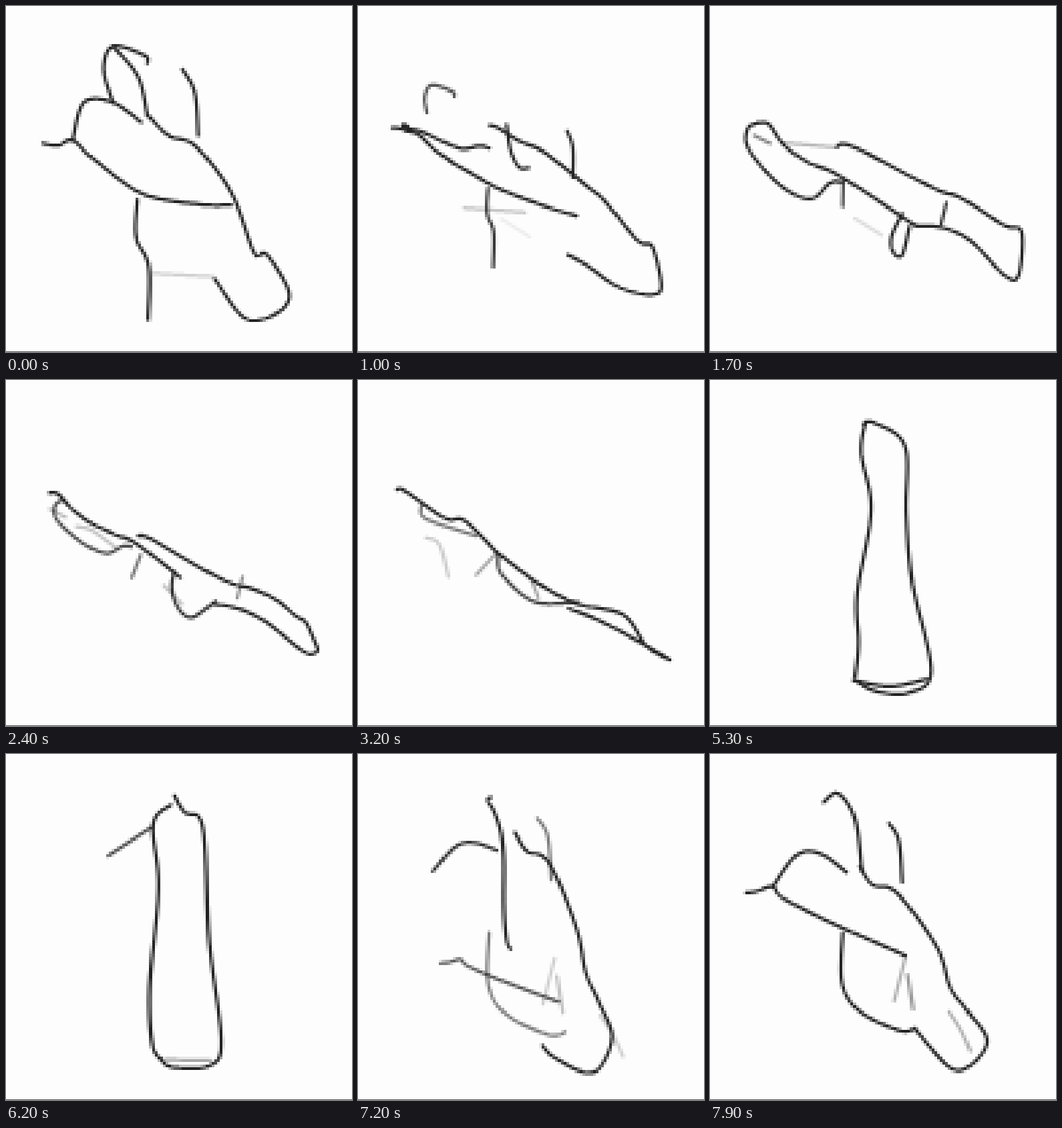
Animation, 518 px wide and 518 px high, one loop 8 s. Source, as an HTML page with a canvas:

```html
<!DOCTYPE html>
<html lang="en">
<head>
<meta charset="utf-8">
<title>Morphing sketch</title>
<style>
  html, body { margin: 0; width: 100%; height: 100%; overflow: hidden; background: #fdfdfd; }
  canvas { display: block; width: 100vw; height: 100vh; image-rendering: pixelated; }
  .rule { position: absolute; left: 0; right: 0; bottom: 0; height: 1px; background: #555; }
</style>
</head>
<body>
<canvas id="sketch" width="128" height="128"></canvas>
<div class="rule"></div>
<script>
const STAGE = 518, GRID = 128, LOOP = 8000, STEP = 100, SAMPLES = 90;
const HOLDS = [2500, 2900, 3300, 3800, 4300, 4700, 6100, 7100];
const MAIN = ['back', 'belly', 'neck'];

// A few key points per stroke, joined by a spline; "@" gives the opacity.
const POSES = [
  { t: 300, strokes: {
    back: '212,163 243,194 284,210 338,281 372,370 390,372 424,430 404,461 358,468 312,408',
    belly: '55,206 78,209 100,201 130,228 204,281 290,297 337,298',
    neck: '160,60 198,106 212,163',
    head: '100,201 117,144 160,144 203,174',
    crest: '160,144 146,95 160,60 208,74 212,86',
    leg: '197,290 195,346 214,390 213,470',
    tail: '264,95 283,130 288,194',
    wisp: '220,400 310,405 @.2'
  } },
  { t: 1700, strokes: {
    back: '190,211 215,211 335,273 375,287 440,328 467,338 462,404 440,402 388,350 345,331 308,329',
    belly: '72,175 88,177 110,207 145,233 195,255 308,329',
    neck: '288,311 272,345 274,368 288,373 299,330',
    head: '72,175 56,184 58,215 105,268 150,289 180,265 198,264',
    crest: '66,194 90,206 @.55',
    leg: '200,262 199,300 @.8',
    tail: '354,295 346,326 @.9',
    wisp: '110,205 190,212 @.3',
    flick: '217,318 257,343 @.15'
  } },
  { t: 3200, strokes: {
    back: '208,258 262,299 325,334 396,351 432,398 470,420 432,398 365,362 315,342',
    belly: '58,164 70,166 130,207 160,211 208,258',
    neck: '210,262 216,292 265,332 330,332 @.85',
    head: '95,188 102,208 177,233 @.6',
    leg: '205,262 177,292 @.4',
    wisp: '102,236 122,246 135,295 @.22',
    flick: '258,295 270,325 @.4'
  } },
  { t: 4100, strokes: {
    back: '250,210 266,289 340,360 392,395 436,412 470,435 408,417',
    belly: '54,440 425,439 @.85',
    neck: '192,51 220,54 232,100 240,145 236,280 232,304 @.9',
    head: '103,98 101,145 @.9',
    crest: '103,98 140,86 @.2',
    leg: '218,60 218,90 @.8',
    wisp: '101,145 126,180 182,203 @.2',
    flick: '260,434 320,434 @.3'
  } },
  { t: 5300, strokes: {
    back: '230,66 243,63 292,98 294,200 303,305 331,435 300,468 250,467 217,450',
    belly: '215,450 270,459 325,448',
    neck: '232,65 226,110 241,195 220,320 222,395 217,445'
  } },
  { t: 6200, strokes: {
    back: '252,62 268,88 295,110 304,280 322,430 304,467 248,469 230,455',
    belly: '238,458 305,459 @.4',
    neck: '247,76 220,105 228,200 215,350 219,435 232,458',
    head: '153,152 218,110 @.8'
  } },
  { t: 7900, strokes: {
    back: '224,168 243,196 280,208 340,290 360,350 385,384 415,430 386,469 356,467 307,412',
    belly: '54,208 70,206 94,199 110,216 182,253 293,302',
    neck: '170,72 192,59 217,97 227,175',
    head: '94,199 130,151 165,149 205,177',
    crest: '358,386 375,412 390,445 @.35',
    leg: '199,268 198,343 225,386 285,414 307,410',
    tail: '268,104 283,130 288,192',
    wisp: '293,304 276,370 @.35',
    flick: '296,330 304,382 @.45'
  } }
];

const ctx = document.getElementById('sketch').getContext('2d');
const mix = (a, b, u) => a + (b - a) * u;
const mixPoint = (p, q, u) => [mix(p[0], q[0], u), mix(p[1], q[1], u)];

// Catmull-Rom spline through the key points.
function smooth(pts) {
  const out = [pts[0]];
  const spline = (a, b, c, d, u) => b + 0.5 * u * (c - a +
    u * (2 * a - 5 * b + 4 * c - d + u * (3 * (b - c) + d - a)));
  for (let i = 0; i < pts.length - 1; i++) {
    const b = pts[i], c = pts[i + 1], a = pts[i - 1] || b, d = pts[i + 2] || c;
    for (let k = 1; k <= 10; k++) {
      out.push([0, 1].map(n => spline(a[n], b[n], c[n], d[n], k / 10)));
    }
  }
  return out;
}

// Even spacing along the length, so that strokes can be blended point by point.
function resample(pts) {
  const len = [0];
  for (let i = 1; i < pts.length; i++) {
    len.push(len[i - 1] + Math.hypot(pts[i][0] - pts[i - 1][0], pts[i][1] - pts[i - 1][1]));
  }
  const total = len[len.length - 1];
  let j = 1;
  return Array.from({ length: SAMPLES }, (_, i) => {
    const at = total * i / (SAMPLES - 1);
    while (j < pts.length - 1 && len[j] < at) j++;
    return mixPoint(pts[j - 1], pts[j], (at - len[j - 1]) / (len[j] - len[j - 1] || 1));
  });
}

function parse(text) {
  const [path, alpha = 1] = text.split('@');
  const pts = path.trim().split(' ').map(p => p.split(',').map(Number));
  return { pts: resample(smooth(pts)), alpha: +alpha };
}

// Centre and longest side of the main strokes.
function measure(strokes) {
  const pts = MAIN.flatMap(id => strokes[id].pts);
  const spans = [0, 1].map(n => {
    const vals = pts.map(p => p[n]);
    return [Math.min(...vals), Math.max(...vals)];
  });
  return {
    centre: spans.map(([lo, hi]) => (lo + hi) / 2),
    size: Math.max(...spans.map(([lo, hi]) => hi - lo))
  };
}

// A stroke found on one side only fades where it stands.
function blend(from, to, u) {
  const out = {};
  for (const id of new Set([...Object.keys(from), ...Object.keys(to)])) {
    const a = from[id] || { pts: to[id].pts, alpha: 0 };
    const b = to[id] || { pts: a.pts, alpha: 0 };
    out[id] = {
      pts: a.pts.map((p, i) => mixPoint(p, b.pts[i], u)),
      alpha: mix(a.alpha, b.alpha, u)
    };
  }
  return out;
}

const poses = POSES.map(({ t, strokes }) => {
  const parsed = Object.fromEntries(Object.entries(strokes).map(([id, s]) => [id, parse(s)]));
  return { t, strokes: parsed, size: measure(parsed).size };
});

// Blend the two nearest poses and keep the drawing from shrinking on the way.
function poseAt(t) {
  let i = 1;
  while (i < poses.length - 1 && poses[i].t < t) i++;
  const a = poses[i - 1], b = poses[i];
  const u = Math.min(1, Math.max(0, (t - a.t) / (b.t - a.t)));
  const strokes = blend(a.strokes, b.strokes, u);
  const { centre, size } = measure(strokes);
  const scale = mix(a.size, b.size, u) / size;
  for (const s of Object.values(strokes)) s.pts = s.pts.map(p => mixPoint(centre, p, scale));
  return strokes;
}

ctx.lineCap = ctx.lineJoin = 'round';
ctx.lineWidth = 5;
ctx.strokeStyle = '#222';

function draw(time) {
  let t = Math.floor(time % LOOP / STEP) * STEP;
  if (HOLDS.includes(t)) t -= STEP;
  ctx.setTransform(GRID / STAGE, 0, 0, GRID / STAGE, 0, 0);
  ctx.globalAlpha = 1;
  ctx.fillStyle = '#fdfdfd';
  ctx.fillRect(0, 0, STAGE, STAGE);
  for (const { pts, alpha } of Object.values(poseAt(t))) {
    ctx.globalAlpha = alpha;
    ctx.beginPath();
    pts.forEach(p => ctx.lineTo(p[0], p[1]));
    ctx.stroke();
  }
}

const start = performance.now();
function tick() {
  draw(performance.now() - start);
  requestAnimationFrame(tick);
}
tick();
</script>
</body>
</html>
```
